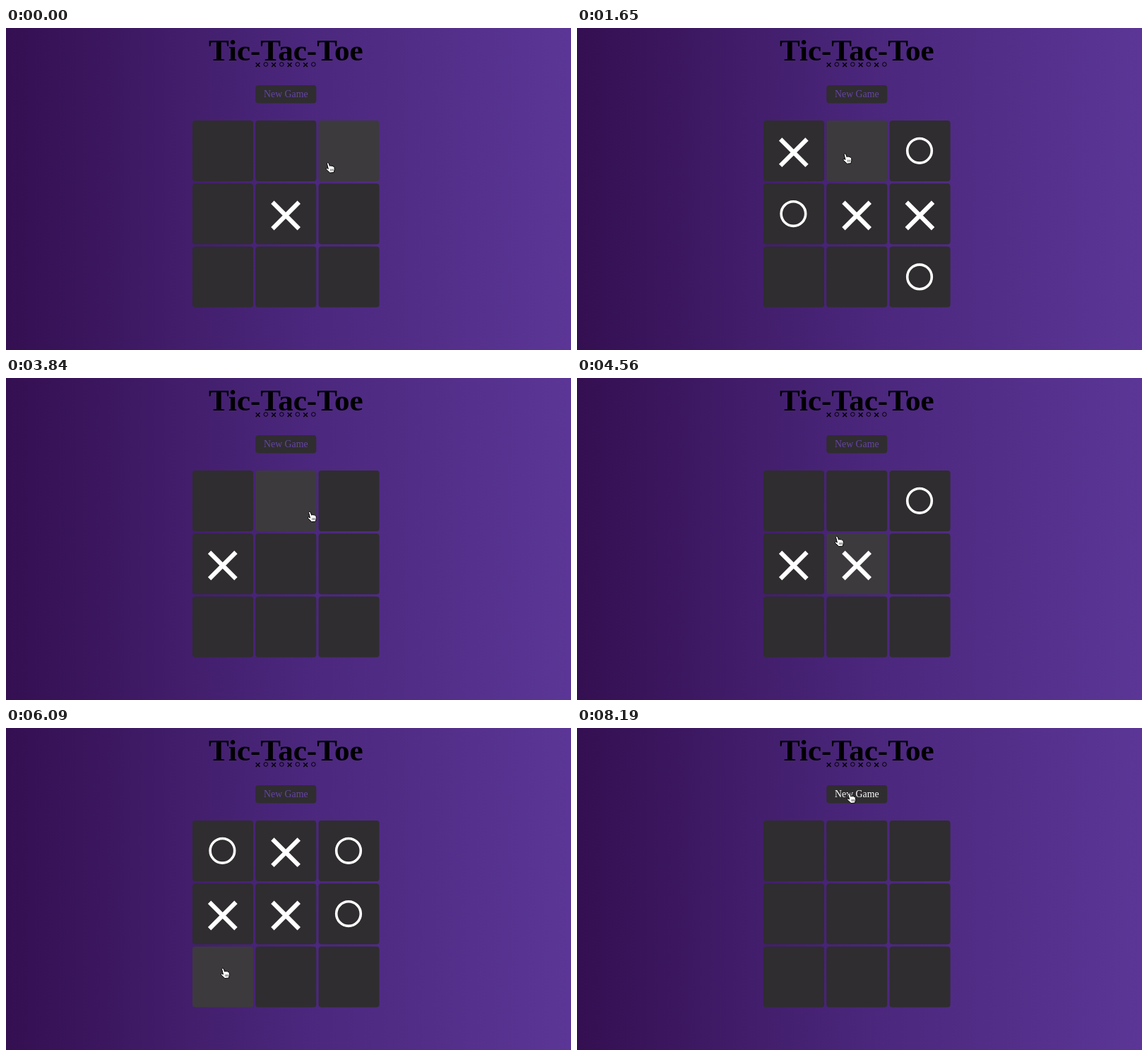
An HTML page with a canvas that plays this animation: 800x456 px, repeating every 8220 ms.

```html
<!DOCTYPE html>
<html lang="en">
<head>
<meta charset="utf-8">
<title>Tic-Tac-Toe</title>
<style>
  html, body { margin: 0; width: 100%; height: 100%; overflow: hidden; }
  canvas { display: block; }
</style>
</head>
<body>
<canvas id="stage" width="800" height="456"></canvas>
<script>
const ctx = document.getElementById('stage').getContext('2d');
const LOOP = 8220, FADE = 200;
const SERIF = '"Liberation Serif", "Times New Roman", serif';
const CENTER = 396.3, CELL = 86, PITCH = 89.3, LEFT = 264, TOP = 131;
const DARK = '#2f2d2f', LIT = '#3d3a3d', WHITE = '#fff', BLACK = '#000';
const BUTTON = { x: 353.3, y: 81, w: 86, h: 25.5 };

const cells = Array.from({ length: 9 }, (_, i) => (
  { x: LEFT + i % 3 * PITCH, y: TOP + Math.floor(i / 3) * PITCH, w: CELL, h: CELL }
));

// Each run clicks its targets at a steady beat; N is the New Game button, digits are cells.
// rest: wait before setting off to the first target; settle: wait over a target before the click.
const runs = [
  { first: -180, beat: 325, targets: '420853167' },
  { first: 3120, targets: 'N', settle: 150 },
  { first: 3610, beat: 400, targets: '32401' },
  { first: 5650, beat: 520, targets: '5678', rest: 190 },
  { first: 8130, targets: 'N', rest: 350, settle: 150 }
];

const clicks = runs.flatMap(({ first, beat = 0, targets, rest = 40, settle = 60 }) =>
  [...targets].map((target, i) => ({
    target, settle,
    time: first + i * beat,
    rest: i ? 40 : rest,
    ...pointOn(target)
  })));

const hand = new Path2D('M-1.6 1.2Q-1-.7 .8.5L2.5 5Q3.8 3.5 5 4.8Q6.4 4 7 5.5Q8.7 5 9 6.8L9.2 9.6L8.3 14L2.7 14.5L-2.4 9.7Q-3.6 7.5-1.4 7.8L.3 8.9Z');
const knuckles = new Path2D('M3.6 9V12M5.4 9V12M7.1 9V11.8');
const arrow = new Path2D('M0 0V12L2.8 9.4L4.6 13.5L6.6 12.6L4.8 8.7H8.6Z');

const background = ctx.createLinearGradient(0, 0, 800, 0);
background.addColorStop(0, '#340f51');
background.addColorStop(0.5, '#4a267b');
background.addColorStop(1, '#5b3696');

function pointOn(target) {
  if (target === 'N') return { x: BUTTON.x + 32, y: BUTTON.y + 11 };
  const { x, y } = cells[target];
  return { x: x + 42, y: y + 31 };
}

function pointerAt(t) {
  const next = clicks.findIndex(c => c.time > t);
  if (next < 0) return clicks.at(-1);
  if (next === 0) return clicks[0];
  const a = clicks[next - 1], b = clicks[next];
  const leave = a.time + b.rest, arrive = b.time - b.settle;
  const u = Math.min(1, Math.max(0, (t - leave) / (arrive - leave)));
  const k = u * u * (3 - 2 * u);
  return { x: a.x + (b.x - a.x) * k, y: a.y + (b.y - a.y) * k };
}

const inside = (p, r) => p.x >= r.x && p.x <= r.x + r.w && p.y >= r.y && p.y <= r.y + r.h;

// Share of the fade time just spent over the button.
function buttonGlow(t) {
  const samples = 20;
  let over = 0;
  for (let i = 0; i < samples; i++) {
    if (inside(pointerAt(t - i * FADE / samples), BUTTON)) over++;
  }
  return over / samples;
}

function movesAt(t) {
  const done = clicks.filter(c => c.time <= t).map(c => c.target);
  return done.slice(done.lastIndexOf('N') + 1);
}

// Crosses sit at even turns, rings at odd ones.
function result(moves) {
  const lines = ['012', '345', '678', '036', '147', '258', '048', '246'];
  const wins = side => lines.some(line => [...line].every(c => moves.includes(c) && moves.indexOf(c) % 2 === side));
  if (wins(0)) return 'Player 1 (x) wins!';
  if (wins(1)) return 'Player 2 (o) wins!';
  return moves.length === 9 ? "It's a draw!" : '';
}

function box(r, color) {
  ctx.fillStyle = color;
  ctx.beginPath();
  ctx.roundRect(r.x, r.y, r.w, r.h, 4);
  ctx.fill();
}

function text(str, y, font, color) {
  ctx.font = `${font} ${SERIF}`;
  ctx.textAlign = 'center';
  ctx.fillStyle = color;
  ctx.fillText(str, CENTER, y);
}

function outline(width, color, trace) {
  ctx.strokeStyle = color;
  ctx.lineWidth = width;
  ctx.beginPath();
  trace();
  ctx.stroke();
}

function cross(x, y, r, width, color) {
  outline(width, color, () => {
    for (const s of [-1, 1]) {
      ctx.moveTo(x - r, y - r * s);
      ctx.lineTo(x + r, y + r * s);
    }
  });
}

function ring(x, y, r, width, color) {
  outline(width, color, () => ctx.arc(x, y, r, 0, Math.PI * 2));
}

function drawHeader(t) {
  text('Tic-Tac-Toe', 46.3, 'bold 43.1px', BLACK);
  for (let i = 0; i < 8; i++) {
    const x = 356.6 + i * 11.25;
    if (i % 2) ring(x, 51.5, 2.8, 1, BLACK);
    else cross(x, 52.2, 2.9, 1.4, BLACK);
  }
  const glow = buttonGlow(t);
  const mix = [102, 68, 168].map(c => Math.round(c + (255 - c) * glow));
  box(BUTTON, DARK);
  text('New Game', 98, '13.8px', `rgb(${mix})`);
}

function drawBoard(t, pointer) {
  for (const cell of cells) box(cell, inside(pointer, cell) ? LIT : DARK);
  const moves = movesAt(t);
  moves.forEach((target, turn) => {
    const cell = cells[target], x = cell.x + CELL / 2, y = cell.y + CELL / 2;
    if (turn % 2) ring(x - 0.6, y - 0.2, 17.3, 3.6, WHITE);
    else cross(x - 0.2, y + 2.2, 18.7, 6.2, WHITE);
  });
  text(result(moves), 427, '14.7px', WHITE);
}

function drawPointer(p) {
  const clickable = [BUTTON, ...cells].some(r => inside(p, r));
  const shape = clickable ? hand : arrow;
  ctx.save();
  ctx.translate(p.x, p.y);
  ctx.lineJoin = 'round';
  ctx.lineWidth = 1;
  ctx.fillStyle = clickable ? WHITE : BLACK;
  ctx.strokeStyle = clickable ? BLACK : WHITE;
  ctx.fill(shape);
  ctx.stroke(shape);
  if (clickable) {
    ctx.lineWidth = 0.6;
    ctx.stroke(knuckles);
  }
  ctx.restore();
}

function draw(t) {
  const pointer = pointerAt(t);
  ctx.fillStyle = background;
  ctx.fillRect(0, 0, 800, 456);
  drawHeader(t);
  drawBoard(t, pointer);
  drawPointer(pointer);
}

let began;
function tick(now) {
  began ??= now;
  draw((now - began) % LOOP);
  requestAnimationFrame(tick);
}
requestAnimationFrame(tick);
</script>
</body>
</html>
```
